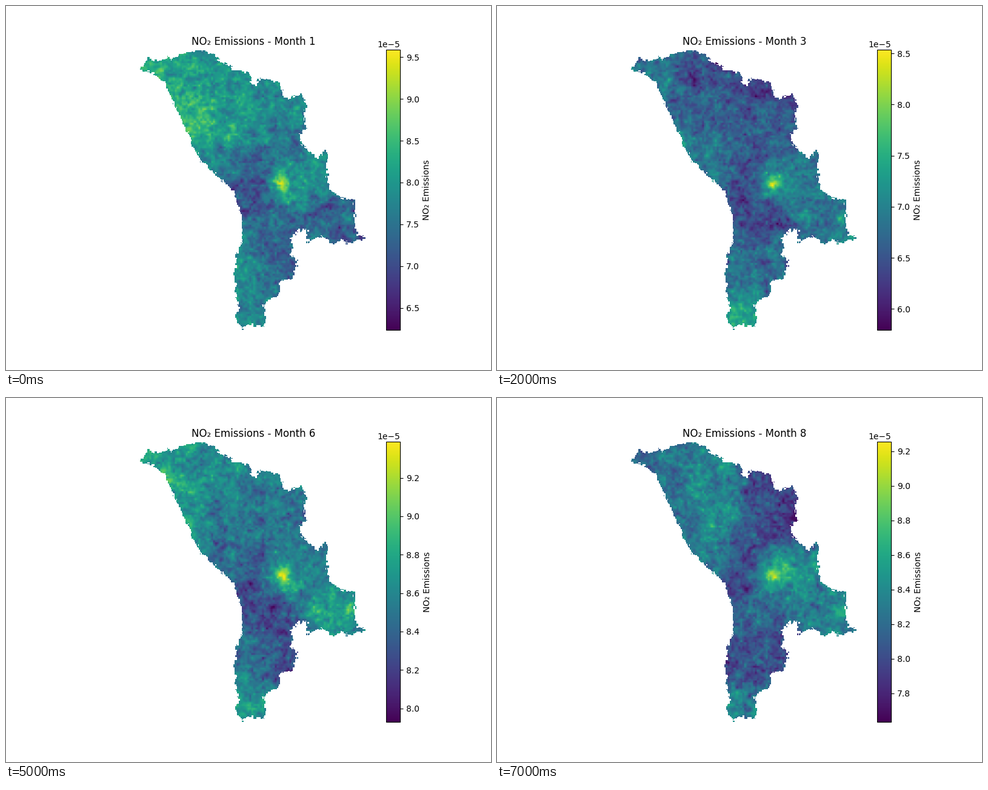
A matplotlib script for the animation above (8 s loop, 800x600 px).

```python
import numpy as np
import matplotlib.pyplot as plt
from matplotlib.animation import FuncAnimation
from matplotlib.path import Path

LEFT, RIGHT, TOP, BOTTOM = 221, 596, 72, 534
COLS, ROWS = 250, 308

# Corners of the border in stage pixels, clockwise from the north-west tip
BORDER = [
    (221, 106), (233, 86), (246, 89), (258, 91), (267, 82), (273, 89),
    (285, 81), (320, 72), (341, 79), (353, 92), (370, 97), (376, 107),
    (401, 110), (404, 123), (413, 134), (417, 121), (452, 126), (457, 149),
    (468, 154), (475, 148), (487, 147), (496, 162), (492, 183), (494, 200),
    (484, 216), (490, 229), (511, 249), (520, 249), (523, 240), (531, 240),
    (529, 275), (534, 302), (552, 315), (575, 321), (575, 358), (580, 378),
    (596, 383), (567, 392), (553, 386), (539, 394), (520, 378), (497, 392),
    (496, 367), (468, 381), (475, 401), (470, 409), (481, 421), (475, 447),
    (452, 455), (451, 475), (425, 492), (428, 512), (424, 529), (398, 525),
    (390, 533), (377, 512), (384, 500), (376, 446), (379, 412), (391, 385),
    (389, 347), (374, 301), (342, 275), (320, 252), (299, 208), (284, 175),
    (263, 128), (244, 111),
]

# Centres of the regions, roughly from north to south
REGIONS = [
    (258, 108), (335, 110), (300, 185), (370, 180), (450, 150), (455, 215),
    (350, 255), (405, 290), (475, 290), (545, 345), (425, 355), (395, 425),
    (455, 425), (400, 515),
]

# Month: scale limits in 1e-5, peak over the capital, level of each region.
# Months left out lie halfway between their neighbours.
SURVEYS = {
    1: [6.236, 9.589, 40,
        62, 48, 65, 56, 49, 42, 46, 20, 46, 32, 32, 50, 28, 46],
    2: [4.051, 7.660, 25,
        50, 48, 32, 40, 33, 33, 38, 46, 54, 44, 60, 52, 36, 66],
    3: [5.795, 8.536, 42,
        40, 24, 38, 30, 20, 27, 42, 22, 40, 40, 22, 38, 33, 54],
    4: [7.583, 9.345, 20,
        72, 18, 34, 34, 56, 56, 46, 50, 58, 62, 44, 60, 57, 55],
    6: [7.929, 9.388, 45,
        54, 50, 54, 41, 42, 38, 38, 28, 42, 52, 23, 38, 25, 50],
    8: [7.635, 9.256, 40,
        32, 44, 38, 46, 20, 20, 44, 22, 47, 44, 32, 28, 26, 42],
}

xs = LEFT + (np.arange(COLS) + 0.5) * (RIGHT - LEFT) / COLS
ys = TOP + (np.arange(ROWS) + 0.5) * (BOTTOM - TOP) / ROWS
X, Y = np.meshgrid(xs, ys)


def noise(rng, cell):
    """Random lattice with the given spacing, blended linearly."""
    gx = np.arange(LEFT - cell, RIGHT + 2 * cell, cell)
    gy = np.arange(TOP - cell, BOTTOM + 2 * cell, cell)
    grid = rng.normal(size=(len(gy), len(gx)))
    rows = np.array([np.interp(xs, gx, row) for row in grid])
    return np.array([np.interp(ys, gy, col) for col in rows.T]).T


def patches(rng, cell):
    """Flat squares with random levels."""
    grid = rng.normal(size=(ROWS, COLS))
    return grid[((Y - TOP) // cell).astype(int),
                ((X - LEFT) // cell).astype(int)]


def bump(x, y, r):
    return np.exp(-((X - x) ** 2 + (Y - y) ** 2) / (2 * r * r))


def land_mask():
    """Border with small square teeth."""
    rng = np.random.default_rng(3)
    px = X + 1.4 * patches(rng, 4)
    py = Y + 1.4 * patches(rng, 4)
    points = np.column_stack([px.ravel(), py.ravel()])
    return Path(BORDER).contains_points(points).reshape(X.shape)


LAND = land_mask()
WEIGHTS = np.array([bump(x, y, 27) + 1e-9 for x, y in REGIONS])
WEIGHTS /= WEIGHTS.sum(axis=0)
CAPITAL = bump(456, 293, 8) + 0.4 * bump(458, 288, 22)
EAST_TOWN = bump(568, 349, 6)


def texture(rng):
    return (0.055 * noise(rng, 3.5) + 0.065 * noise(rng, 7)
            + 0.045 * noise(rng, 17) + 0.015 * patches(rng, 23))


def emissions(month):
    columns = np.array(list(SURVEYS.values())).T
    low, high, peak, *levels = [np.interp(month, list(SURVEYS), column)
                                for column in columns]
    share = np.tensordot(levels, WEIGHTS, axes=1) + peak * CAPITAL
    share = share / 100 + 0.2 * EAST_TOWN
    share += texture(np.random.default_rng(20 + month))
    data = low + np.clip(share, 0, 1) * (high - low)
    return np.where(LAND, data, np.nan) * 1e-5, low * 1e-5, high * 1e-5


MAPS = [emissions(month) for month in range(1, 9)]

fig, ax = plt.subplots(figsize=(8, 6), dpi=100)
first, low, high = MAPS[0]
image = ax.imshow(first, cmap="viridis", vmin=low, vmax=high,
                  interpolation="nearest",
                  extent=(LEFT, RIGHT, BOTTOM, TOP))
fig.colorbar(image, ax=ax, label="NO₂ Emissions")
ax.axis("off")
title = ax.set_title("NO₂ Emissions - Month 1")


def draw(i):
    data, low, high = MAPS[i]
    image.set_data(data)
    image.set_clim(low, high)
    title.set_text(f"NO₂ Emissions - Month {i + 1}")
    return image, title


anim = FuncAnimation(fig, draw, frames=len(MAPS), interval=1000,
                     repeat=True, repeat_delay=0, blit=False)
plt.show()
```
